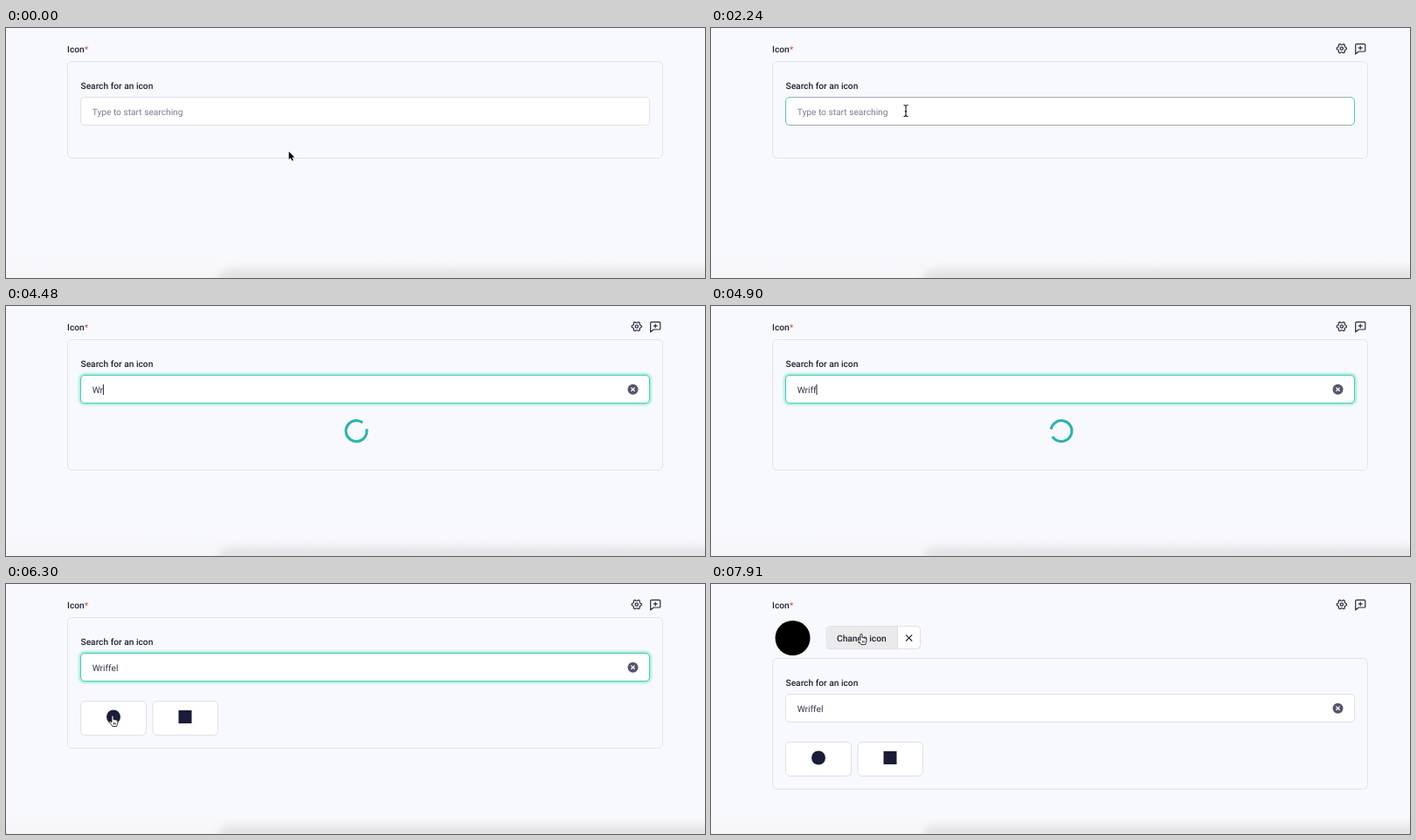
Recreate the animation shown at these times as an HTML page. Size 800 by 287 pixels, loop 8000 ms.

```html
<!DOCTYPE html>
<html lang="en">
<head>
<meta charset="utf-8">
<title>Icon picker</title>
<style>
  html, body { margin: 0; height: 100%; overflow: hidden; background: #f8f9fe; }
  svg { display: block; width: 100vw; height: 100vh; }
  text { font: 10.2px Roboto, Arial, sans-serif; fill: #32324d; white-space: pre; text-rendering: geometricPrecision; }
  .label { font-weight: 500; fill: #212134; }
  .box { fill: #fff; stroke: #dfdfe8; }
  .line { fill: none; stroke: #2a2a42; stroke-width: 1.2; stroke-linejoin: round; }
</style>
</head>
<body>
<svg viewBox="0 0 800 287">
  <defs>
    <linearGradient id="edge">
      <stop offset="0" stop-color="#58c5bd"/><stop offset=".02" stop-color="#a0abb2"/>
      <stop offset=".98" stop-color="#a0abb2"/><stop offset="1" stop-color="#58c5bd"/>
    </linearGradient>
    <linearGradient id="fade" x2="0" y2="1">
      <stop stop-color="#f8f9fe"/><stop offset="1" stop-color="#f6f6f8"/>
    </linearGradient>
    <filter id="blur" x="-10%" y="-50%" width="120%" height="200%"><feGaussianBlur stdDeviation="5"/></filter>
    <filter id="glow" x="-2%" y="-30%" width="104%" height="160%"><feGaussianBlur stdDeviation="1"/></filter>
  </defs>
  <rect width="800" height="287" fill="#f8f9fe"/>
  <rect y="262" width="800" height="25" fill="url(#fade)"/>
  <rect x="243" y="277" width="640" height="60" rx="12" fill="#e3e3e5" filter="url(#blur)"/>

  <text class="label" x="70" y="27.5">Icon<tspan fill="#d9604c">*</tspan></text>
  <g id="tools" class="line">
    <path id="gear"/>
    <circle cx="721.8" cy="23.5" r="1.7"/>
    <path d="M738.7 18.4h9.1q1 0 1 1v6.6q0 1-1 1h-6.6l-3.5 2.8v-10.4q0-1 1-1zM743.2 20.4v4.8M740.8 22.8h4.8"/>
  </g>

  <g id="chosen">
    <circle cx="93.5" cy="62" r="20"/>
    <rect class="box" x="132" y="48.5" width="107.5" height="26" rx="4"/>
    <path id="hover" d="M213.5 49H136.5q-4 0-4 4v17q0 4 4 4h77z" fill="#eaeaec"/>
    <path d="M213.5 49v25" stroke="#dfdfe8"/>
    <text class="label" x="144" y="65.6">Change icon</text>
    <path class="line" d="M223 58.3l7.2 7.2m0-7.2l-7.2 7.2"/>
  </g>

  <g id="panel">
    <rect id="frame" x="70.5" y="38.5" width="681" height="111" rx="5" fill="#f8f9fe" stroke="#e2e2ea"/>
    <text class="label" x="85.5" y="70">Search for an icon</text>
    <rect id="halo" x="85" y="79" width="652" height="33" rx="5" fill="none" stroke="#a5efe0" stroke-width="4" filter="url(#glow)"/>
    <rect id="field" class="box" x="85.5" y="79.5" width="651" height="32" rx="4.5"/>
    <text id="query" x="98.7" y="99.6"></text>
    <path id="caret" d="M0 90v12" stroke="#212134"/>
    <g id="clear">
      <circle cx="717.5" cy="95.7" r="6" fill="#55556b"/>
      <path d="M715.4 93.6l4.2 4.2m0-4.2l-4.2 4.2" stroke="#fff" stroke-width="1.3"/>
    </g>
    <circle id="spinner" cx="401" cy="143.5" r="12" fill="none" stroke="#2ab3ae" stroke-width="3" pathLength="360" stroke-dasharray="318 42"/>
    <g id="results">
      <rect class="box" x="85.5" y="134.5" width="75" height="39" rx="5"/>
      <rect class="box" x="168" y="134.5" width="74.5" height="39" rx="5"/>
      <circle cx="123" cy="152.5" r="8" fill="#1a1c3a"/>
      <rect x="197.5" y="145" width="15" height="15" fill="#1a1c3a"/>
    </g>
  </g>

  <g id="cursor">
    <path id="arrow" d="M.7.7v9.2l2.1-2 1.6 3.6 1.5-.7-1.6-3.4h3z" stroke="#fff" stroke-width="1.2" paint-order="stroke"/>
    <path id="beam" d="M-2.5-6.5Q0-6.5 0-5V5Q0 6.5-2.5 6.5M2.5-6.5Q0-6.5 0-5M0 5Q0 6.5 2.5 6.5M-1.3.8h2.6" fill="none" stroke="#111" stroke-width="1.1"/>
    <path id="hand" d="M-1 1.2a1 1 0 0 1 2 0v3.3l3.7.7q1.4.4 1.3 2l-.8 3.3-.4 2h-5l-1-1.7-2.6-3.3q-.3-1.2.9-1.1l1.9 1.3zM1.4 8v2.6M3.1 8v2.6" fill="#fff" stroke="#222" stroke-width=".9"/>
  </g>
</svg>
<script>
const $ = id => document.getElementById(id);
const show = (id, on) => $(id).style.display = on ? '' : 'none';
const within = (t, a, b) => t >= a && t < b;

const LOOP = 8000, STEP = 70, WORD = 'Wriffel';
const KEYS = [4200, 4410, 4550, 4690, 4830, 5040, 5180];
const FOCUS = 840, GLOW = 3220, FOUND = 5320, PICK = 6370, REOPEN = 7840;

// time, x, y
const PATH = [
  [0, 323, 141], [70, 323, 141], [210, 146, 67], [280, 146, 67], [420, 223, 95],
  [3430, 223, 95], [3710, 230, 91], [5600, 230, 91], [5950, 172, 141],
  [6230, 122, 151], [6860, 122, 151], [7000, 136, 143], [7420, 172, 57], [LOOP, 172, 57]
];

function cursorAt(t) {
  const i = PATH.findIndex(p => p[0] > t), [a, x, y] = PATH[i - 1], [b, u, v] = PATH[i];
  const k = (t - a) / (b - a);
  return [x + (u - x) * k, y + (v - y) * k];
}

// Six rounded teeth
let gear = '';
for (let i = 0; i < 72; i++) {
  const a = i * Math.PI / 36, r = 4.9 + .7 * Math.tanh(2 * Math.cos(6 * a));
  gear += `${i ? 'L' : 'M'}${721.8 + r * Math.cos(a)} ${23.5 + r * Math.sin(a)}`;
}
$('gear').setAttribute('d', gear + 'z');

function draw(t) {
  const typed = KEYS.filter(k => t >= k).length;
  const picked = t >= PICK, reopened = t >= REOPEN;
  const focused = within(t, FOCUS, PICK), glowing = within(t, GLOW, PICK);

  show('tools', focused || t >= 7420);
  show('chosen', picked);
  show('hover', t >= 7350);
  show('panel', !picked || reopened);
  $('panel').setAttribute('transform', `translate(0 ${reopened ? 47 : 0})`);
  $('frame').setAttribute('height', typed ? 150 : 111);

  show('halo', glowing);
  $('field').style.stroke = glowing ? '#4fc7b8' : focused ? 'url(#edge)' : '';
  const query = $('query');
  query.textContent = typed ? WORD.slice(0, typed) : 'Type to start searching';
  query.style.fill = typed ? '' : '#7c7c90';
  show('caret', within(t, 3430, 3640) || within(t, KEYS[0], 5670));
  const end = typed && !picked ? query.getComputedTextLength() : 0;
  $('caret').setAttribute('transform', `translate(${99 + end} 0)`);
  show('clear', typed);
  show('spinner', typed && t < FOUND);
  $('spinner').setAttribute('transform', `rotate(${190 + (t - 4900) * .48} 401 143.5)`);
  show('results', t >= FOUND);

  const shape = within(t, 350, 5740) ? 'beam'
    : within(t, 5740, 6510) || t >= 7350 ? 'hand' : 'arrow';
  for (const id of ['arrow', 'beam', 'hand']) show(id, id === shape);
  show('cursor', !within(t, KEYS[0], 5670));
  $('cursor').setAttribute('transform', `translate(${cursorAt(t)})`);
}

const start = performance.now();
function tick() {
  const t = (performance.now() - start) % LOOP;
  draw(Math.min(Math.floor(t / STEP) * STEP, 7910));
  requestAnimationFrame(tick);
}
tick();
</script>
</body>
</html>
```
